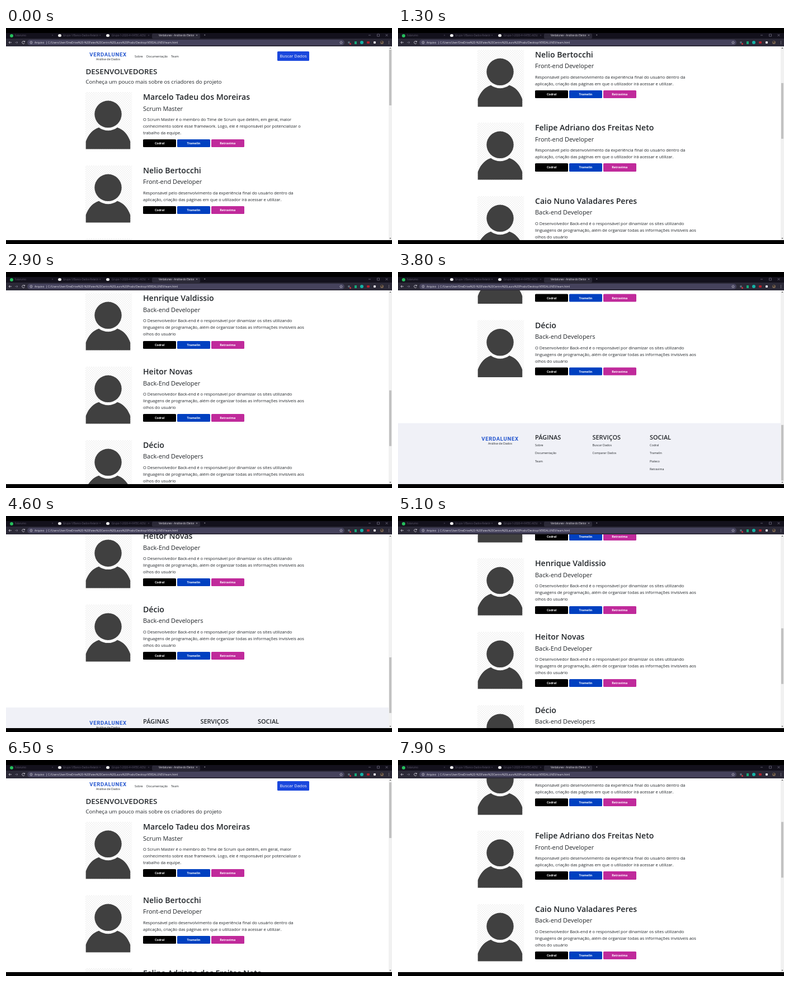
Animation, 690 px wide and 388 px high, one loop 8000 ms. Source, as an HTML page:

```html
<!DOCTYPE html>
<html lang="pt-BR">
<head>
<meta charset="utf-8">
<title>Verdalunex</title>
<style>
@property --s { syntax: '<length>'; inherits: true; initial-value: 0px; }
html, body { margin: 0; width: 100%; height: 100%; overflow: hidden; background: #000; }
#stage {
  position: relative; width: 690px; height: 388px; overflow: hidden;
  font-family: 'Open Sans', 'Noto Sans', sans-serif; color: #212529;
  animation: scroll 8s infinite;
}
#stage div, #stage svg { position: absolute; }
#view { left: 0; top: 32.5px; width: 690px; height: 348px; background: #fff; overflow: hidden; }
#page { left: 0; top: -32.5px; width: 684px; height: 1200px; transform: translateY(calc(-1 * var(--s))); }
.t { line-height: 0; white-space: nowrap; }
.mid { transform: translateX(-50%); }
.logo { font: 700 9.5px/0 Roboto, sans-serif; letter-spacing: .7px; color: #2456cf; }
.small { font-size: 5.4px; }
.h1 { font-size: 13.4px; font-weight: 600; }
.lead { font-size: 9.55px; }
.name { font-size: 14.1px; font-weight: 600; }
.role { font-size: 10.95px; }
.col { font-size: 10.95px; font-weight: 600; }
.bio { font-size: 7.5px; line-height: 12px; white-space: nowrap; }
.btn { border-radius: 1.5px; color: #fff; text-align: center; white-space: nowrap; }
.link { width: 59.3px; height: 14.3px; font-size: 5.4px; font-weight: 700; line-height: 14.3px; }
.pic { left: 142px; width: 83px; height: 102.5px; background: repeating-conic-gradient(#f3f3f3 0 25%, #fff 0 50%) 0 0 / 4px 4px; }
.thumb { left: 685px; top: 39px; width: 4px; height: 100px; background: #c1c1c1; transform: translateY(calc(.288 * var(--s))); }
.bar { font-size: 4.8px; color: #e4e2ea; }
.dim { color: #5d596c; }
.clip { font-size: 4.5px; overflow: hidden; line-height: 8px; }

/* The page moves ten times a second. */
@keyframes scroll {
  0% { --s: 0px; animation-timing-function: step-end; }
  1.25% { --s: 0px; animation-timing-function: steps(12); }
  16.25% { --s: 208px; animation-timing-function: steps(16); }
  36.25% { --s: 603px; animation-timing-function: steps(8); }
  46.25% { --s: 818.5px; animation-timing-function: step-end; }
  55% { --s: 818.5px; animation-timing-function: steps(7); }
  63.75% { --s: 565px; animation-timing-function: steps(12); }
  78.75% { --s: 0px; animation-timing-function: step-end; }
  80% { --s: 0px; animation-timing-function: steps(1); }
  81.25% { --s: 4px; animation-timing-function: steps(14); }
  98.75% { --s: 251px; animation-timing-function: step-end; }
  100% { --s: 251px; }
}
</style>
</head>
<body>
<div id="stage">
  <div id="chrome"></div>
  <div id="view"><div id="page"></div></div>
  <div id="rail"></div>
</div>
<script>
const text = (x, y, cls, str) => `<div class="t ${cls}" style="left:${x}px;top:${y}px">${str}</div>`;
const box = (x, y, w, h, color, radius = 0) =>
  `<div style="left:${x}px;top:${y}px;width:${w}px;height:${h}px;background:${color};border-radius:${radius}px"></div>`;
const dot = (x, y, r, color) => box(x - r, y - r, 2 * r, 2 * r, color, r);
const fill = (id, parts) => { document.getElementById(id).innerHTML = parts.flat().join(''); };

const sites = [['Codral', '#000'], ['Tramelin', '#0040c0'], ['Retravima', '#c02a9b']];
const bios = {
  scrum: ['O Scrum Master é o membro do Time de Scrum que detém, em geral, maior',
    'conhecimento sobre esse framework. Logo, ele é responsável por potencializar o',
    'trabalho da equipe.'],
  front: ['Responsável pelo desenvolvimento da experiência final do usuário dentro da',
    'aplicação, criação das páginas em que o utilizador irá acessar e utilizar.'],
  back: ['O Desenvolvedor Back-end é o responsável por dinamizar os sites utilizando',
    'linguagens de programação, além de organizar todas as informações invisíveis aos',
    'olhos do usuário']
};
const team = [
  ['Marcelo Tadeu dos Moreiras', 'Scrum Master', 'scrum'],
  ['Nelio Bertocchi', 'Front-end Developer', 'front'],
  ['Felipe Adriano dos Freitas Neto', 'Front-end Developer', 'front'],
  ['Caio Nuno Valadares Peres', 'Back-end Developer', 'back'],
  ['Henrique Valdissio', 'Back-end Developer', 'back'],
  ['Heitor Novas', 'Back-End Developer', 'back'],
  ['Décio', 'Back-end Developers', 'back']
];
const avatar = `<svg width="83" height="103" fill="#404040">
  <circle cx="40.5" cy="39.8" r="24.2"/>
  <path d="M.7 102.5V88.8C5 75.8 14 66.8 24 63.7C34 71 47 71 57 63.7C67 66.8 76 75.8 80.2 88.8V102.5Z"/></svg>`;

function member([name, role, kind], i) {
  const y = 115 + 131.6 * i, lines = bios[kind];
  const buttons = sites.map(([label, color], k) =>
    `<div class="btn link" style="left:${245 + 60.8 * k}px;top:${y + 49.2 + 12 * lines.length}px;background:${color}">${label}</div>`);
  return [
    `<div class="pic" style="top:${y}px">${avatar}</div>`,
    text(245, y + 9, 'name', name),
    text(245, y + 29.5, 'role', role),
    `<div class="bio" style="left:245px;top:${y + 43}px">${lines.join('<br>')}</div>`,
    ...buttons
  ];
}

const logo = (y) => [
  text(182.5, y, 'logo mid', 'VERDALUNEX'),
  text(182.5, y + 8, 'small mid', 'Análise de Dados')
];
const column = (x, title, items) => [
  text(x, 1114.7, 'col', title),
  ...items.map((item, i) => text(x, 1128.7 + 14.4 * i, 'small', item))
];

fill('page', [
  logo(48),
  text(230, 50.5, 'small', 'Sobre'),
  text(251, 50.5, 'small', 'Documentação'),
  text(295, 50.5, 'small', 'Team'),
  '<div class="btn" style="left:485px;top:42px;width:57px;height:17px;background:#1a47dd;font-size:7.5px;line-height:17px">Buscar Dados</div>',
  text(142.5, 77.5, 'h1', 'DESENVOLVEDORES'),
  text(142.5, 96.5, 'lead', 'Conheça um pouco mais sobre os criadores do projeto'),
  ...team.map(member),
  box(0, 1089.5, 684, 112, '#f0f1f7'),
  logo(1118),
  column(245, 'PÁGINAS', ['Sobre', 'Documentação', 'Team']),
  column(347.5, 'SERVIÇOS', ['Buscar Dados', 'Comparar Dados']),
  column(450, 'SOCIAL', ['Codral', 'Tramelin', 'Pialeco', 'Retravima'])
]);

fill('rail', [
  box(684, 32.5, 6, 348, '#f1f1f1'),
  '<div class="thumb"></div>',
  `<svg style="left:684px;top:33px" width="6" height="348" fill="#555">
    <path d="M1.5 4L3 2L4.5 4ZM1.5 344L3 346L4.5 344Z"/></svg>`
]);

const tab = (x, w, cls, str) =>
  `<div class="t bar clip ${cls}" style="left:${x}px;top:9.3px;width:${w}px">${str}</div>`;
fill('chrome', [
  box(0, 9, 690, 10, '#13111c'),
  box(261, 10, 86, 9, '#2b2937', 2),
  box(0, 19, 690, 13.5, '#2b2937'),
  box(38, 21, 567, 10, '#45425c', 5),
  dot(10, 13.5, 3, '#25c05c'), dot(96, 13.5, 2.7, '#eee'), dot(182, 13.5, 2.7, '#eee'),
  tab(16, 60, 'dim', 'Falarumo'),
  tab(102, 63, 'dim', 'Grupo-1/Banco-Dados-Relatório'),
  tab(189, 61, 'dim', 'Grupo-1-2020-4º-FATEC-ADS/projeto'),
  tab(273, 63, '', 'Verdalunex - Análise do Eleitorado'),
  [83, 168, 255].map(x => text(x, 13.3, 'bar dim mid', '×')),
  text(341, 13.3, 'bar mid', '×'),
  text(355, 13.3, 'bar mid', '+'),
  text(51, 26, 'bar', 'Arquivo'),
  box(71.5, 23.5, .6, 5, '#8d8a9e'),
  text(75, 26, 'bar', 'C:/Users/User/OneDrive%20-%20Fatec%20Centro%20Laura%20Prado/Desktop/VERDALUNEX/team.html'),
  `<svg style="left:0;top:0" width="690" height="33" fill="none" stroke="#d8d6e0" stroke-width=".8">
    <path d="M10 26H5M7 24L5 26L7 28"/>
    <path d="M16 26H21M19 24L21 26L19 28" stroke="#777486"/>
    <path d="M33 24.5A2.4 2.4 0 1 0 33.3 27M33.5 23V25H31.5"/>
    <circle cx="45" cy="26" r="2.2" stroke-width=".6"/><path d="M45 25.6V27.4M45 24.4V25"/>
    <path d="M599 23.5L599.8 25.3L601.6 25.5L600.2 26.7L600.6 28.5L599 27.5L597.4 28.5L597.8 26.7L596.4 25.5L598.2 25.3Z" stroke-width=".5"/>
    <path d="M648 13H652M663.5 11H667.5V15H663.5ZM678.5 11L682.5 15M682.5 11L678.5 15" stroke="#8a879a" stroke-width=".6"/>
    <path d="M684.5 23.5V24.4M684.5 25.6V26.5M684.5 27.7V28.6"/></svg>`,
  dot(613, 26, 2.4, '#5b6b78'), dot(615.5, 28, 1.5, '#d22f3a'),
  box(622.5, 23.5, 4, 5, '#16a878'),
  dot(635.5, 26, 3, '#14b3a6'),
  box(645, 24, 5, 4, '#b3202c', 1),
  box(656.5, 23.5, 4.6, 4.6, '#e4e2ea', 1),
  dot(671.5, 26, 3, '#75614f'), dot(671.5, 25.2, 1.2, '#2b2422')
]);
</script>
</body>
</html>
```
